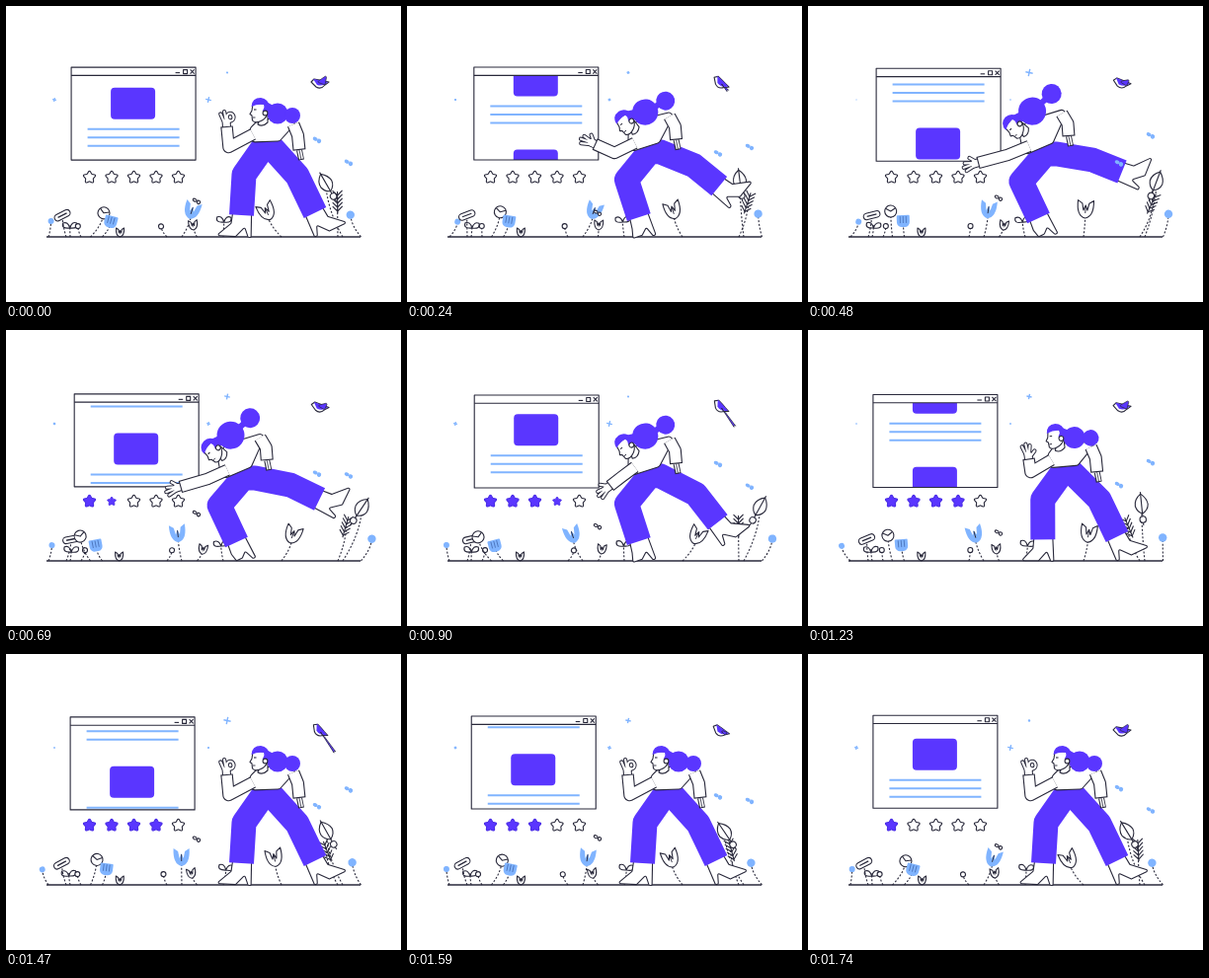
These frames come from a looping animation (400x300 px, 1770 ms). An HTML page with a canvas:

```html
<!DOCTYPE html>
<html lang="en">
<head>
<meta charset="utf-8">
<style>
html, body { margin: 0; width: 100%; height: 100%; overflow: hidden; background: #fff; }
canvas { display: block; width: 400px; height: 300px; }
</style>
</head>
<body>
<canvas id="stage" width="400" height="300"></canvas>
<script>
const g = document.getElementById('stage').getContext('2d');
const LOOP = 1770, STEP = 30, TAU = Math.PI * 2;
const INK = '#29293b', PURPLE = '#5a36ff', BLUE = '#80b4ff', WHITE = '#fff';
let t = 0;

// Timing helpers
const mix = (a, b, k) => a + (b - a) * k;
const wave = (period, peak = 0) => Math.cos(TAU * (t - peak) / period);
function ease(u) {
  u = Math.max(0, Math.min(1, u));
  return u * u * (3 - 2 * u);
}
const pulse = (rise, hold, end) => ease(t / rise) * (1 - ease((t - hold) / (end - hold)));

// Drawing helpers
function paint(fill, stroke, width = 1.1) {
  if (fill) { g.fillStyle = fill; g.fill(); }
  if (stroke) { g.strokeStyle = stroke; g.lineWidth = width; g.stroke(); }
}
function line(pts, color = INK, width = 1.1) {
  g.beginPath();
  for (let i = 0; i < pts.length; i += 2) g.lineTo(pts[i], pts[i + 1]);
  paint(null, color, width);
}
// Closed outline with rounded corners
function poly(pts, radius, fill, stroke, width) {
  const n = pts.length, p = i => pts[i % n];
  g.beginPath();
  g.moveTo((p(0) + p(n - 2)) / 2, (p(1) + p(n - 1)) / 2);
  for (let i = 0; i < n; i += 2) g.arcTo(p(i), p(i + 1), p(i + 2), p(i + 3), radius);
  g.closePath();
  paint(fill, stroke, width);
}
function shape(d, fill, stroke, width = 1.1) {
  const path = new Path2D(d);
  if (fill) { g.fillStyle = fill; g.fill(path); }
  if (stroke) { g.strokeStyle = stroke; g.lineWidth = width; g.stroke(path); }
}
function dot(x, y, r, fill, stroke, ry = r) {
  g.beginPath();
  g.ellipse(x, y, r, ry, 0, 0, TAU);
  paint(fill, stroke);
}
function box(x, y, w, h, r, fill, stroke) {
  g.beginPath();
  g.roundRect(x, y, w, h, r);
  paint(fill, stroke);
}
function at(x, y, angle, draw, scale = 1) {
  g.save();
  g.translate(x, y);
  g.rotate(angle);
  g.scale(scale, scale);
  draw();
  g.restore();
}
// Outlined sleeve, closed with a cuff at its far end
function limb(a, b, c, width) {
  const d = Math.hypot(c[0] - b[0], c[1] - b[1]);
  const inner = c.map((v, i) => v - (v - b[i]) / d * 1.1);
  line([...a, ...b, ...c], INK, width);
  line([...a, ...b, ...inner], WHITE, width - 2.2);
}

function drawWindow() {
  const x = 67.2 + 2.1 * wave(LOOP, 600), y = 64 - 2.1 * wave(LOOP, 130);
  at(x, y, 0, () => {
    g.save();
    g.beginPath();
    g.rect(0, 8.5, 126, 85.5);
    g.clip();
    // Two full periods of the page scroll by in each loop
    for (let i = 0; i < 4; i++) {
      const top = 20.7 + 86 * (i - 2 * t / LOOP);
      box(40, top, 45, 32, 4, PURPLE);
      for (let k = 0; k < 3; k++) {
        const ly = top + 42 + 8.5 * k;
        line([16.5, ly, 109.5, ly], BLUE, 2);
      }
    }
    g.restore();
    box(0, 0, 126, 94, 0, null, INK);
    line([0, 8.3, 126, 8.3]);
    line([105.5, 5.5, 110, 5.5]);
    box(113.5, 2.5, 4, 4, 0, null, INK);
    line([120.5, 2.3, 124.5, 6.5]);
    line([124.5, 2.3, 120.5, 6.5]);
  });
}

function drawStars() {
  const pts = [];
  for (let i = 0; i < 10; i++) {
    const r = i % 2 ? 4 : 7.4, a = i * TAU / 10 - TAU / 4;
    pts.push(r * Math.cos(a), r * Math.sin(a));
  }
  for (let i = 0; i < 5; i++) {
    const p = i < 4 && t < LOOP - i * 60 ? Math.min(1, (t - 540 - i * 105) / 90) : 0;
    const on = p > 0;
    at(84.5 + 22.5 * i, 173.7, 0, () => poly(pts, 1, on ? PURPLE : WHITE, on ? '#4a2de6' : INK),
      on ? 0.4 + 0.6 * p : 1);
  }
}

// Flower heads, drawn around the top of a stem
const tulip = (fill, size) => () => {
  g.scale(size, size);
  shape('M-8 -9 L-3.5 -6 L-2 1 L0 -4 L2 1 L3.5 -6 L8 -9 Q9 7 0 9 Q-9 7 -8 -9 Z',
    fill, fill === WHITE ? INK : null, 1.1 / size);
  line([0, -3, 0, 4], INK, 0.9);
};
const ball = r => () => dot(0, 0, r, BLUE);
const ring = () => dot(0, 0, 2.5, WHITE, INK);
const brush = () => {
  box(-6.5, -6, 13, 12, [1, 1, 5, 5], BLUE);
  for (const x of [-3, 0, 3]) line([x, -5, x, 2], '#4d76bd', 0.9);
};
const disc = () => {
  dot(0, 0, 6, WHITE, INK);
  line([-5, -3, 0, 0, 5, -3]);
};
const pill = () => {
  g.rotate(-0.35);
  box(-8.5, -3.3, 17, 6.6, 3.3, WHITE, INK);
  line([-5, 0, 5, 0], INK, 1.3);
};
const sprout = () => shape('M0 3 Q-9 4 -7 -2 Q-2 -4 0 3 Q9 4 7 -2 Q2 -4 0 3', WHITE, INK);
const stalk = () => {
  line([0, -6, 0, 16]);
  for (let y = -4; y < 14; y += 4) line([-5, y - 3, 0, y + 2, 5, y - 3]);
};
const leaf = () => {
  shape('M0 -10 Q-7 -5 -6.5 2 Q-5 8 0 10 Q6 7 6.5 1 Q6 -5 0 -10 Z', WHITE, INK);
  line([0, -12, 0, 22]);
  dot(0, 16, 3.2, WHITE, INK);
};

// A plant on the ground line whose tip sways once per loop
function plant(head, x, y, swing, peak) {
  const dx = swing * wave(LOOP, peak);
  const tip = y + 0.01 * dx * dx;
  g.setLineDash([2, 1.8]);
  g.beginPath();
  g.moveTo(x, 234);
  g.quadraticCurveTo(x + dx * 0.9, (tip + 234) / 2, x + dx, tip);
  paint(null, INK);
  g.setLineDash([]);
  at(x + dx, tip, 0.03 * dx, head);
}

function drawPlants() {
  plant(ball(3), 43, 218, 9, 360);
  plant(sprout, 65, 222, 1.5, 500);
  plant(pill, 61, 212, 5, 700);
  plant(ring, 76, 223, 4, 700);
  plant(disc, 85.5, 208, 13.5, 0);
  plant(brush, 97.5, 218, 8.5, 0);
  plant(tulip(WHITE, 0.5), 115, 229.5, 0.5, 0);
  plant(ring, 163, 223, 6, 850);
  plant(tulip(BLUE, 1), 178, 206, 12, 150);
  plant(tulip(WHITE, 0.55), 193.5, 222, 6, 650);
  plant(sprout, 220, 216, 3, 1400);
  plant(tulip(WHITE, 1), 279, 206, 15, 885);
  plant(stalk, 336, 194, 14, 450);
  plant(leaf, 341, 176, 20, 740);
  plant(ball(4.2), 359.5, 210.5, 11.5, 780);
  line([41, 234, 359, 234], INK, 1.4);
}

function butterfly(x, y, fill, stroke) {
  at(x, y, 0.4, () => {
    dot(-2.2, -0.5, 2, fill, stroke, 1.3);
    dot(2.2, 0, 1.6, fill, stroke, 1.7);
  });
}
function spark(x, y, r) {
  at(x, y, 0.2, () => {
    line([-r, 0, r, 0], BLUE, 1.4);
    line([0, -r, 0, r], BLUE, 1.4);
  });
}
function drawBird() {
  const up = wave(LOOP / 3);
  at(318, 78, 0.32 * (1 - up), () => {
    shape('M-9 -1 L-6 -4 Q0 -3 4 -2 L9 -1 L5 2 Q1 7 -4 4 Z', WHITE, INK);
    shape('M-7 -4 Q0 -3 8 -1 Q3 4 -3 2 Z', PURPLE);
    poly([-3, -1, 7, -3 - 5 * up, 5, 2], 1, PURPLE, INK, 0.7);
  });
}
function drawAir() {
  const half = wave(LOOP / 2);
  butterfly(315, 148 - 12 * half, BLUE, BLUE);
  butterfly(347, 145 + 14 * half, BLUE, BLUE);
  butterfly(193, 198 + 12 * wave(LOOP / 2, LOOP / 8), WHITE, INK);
  spark(49, 95, 1.1 + 0.9 * half);
  spark(205, 95, 1.6 + 1.3 * half);
  spark(224, 67.5, 2.2 + 1.6 * wave(LOOP / 2, 530));
  drawBird();
}

function drawHand(elbow, wrist) {
  const pinch = t < 120 || t > 1350;
  const angle = Math.atan2(wrist[0] - elbow[0], elbow[1] - wrist[1]);
  const fingers = () => {
    g.beginPath();
    g.moveTo(-2, -4); g.lineTo(-5, -13);
    g.moveTo(0, -4); g.lineTo(-1, -15);
    if (pinch) {
      g.moveTo(2, -4);
      g.ellipse(4.5, -9, 3.4, 3.8, 0, TAU / 4, TAU * 1.25);
    } else {
      g.moveTo(1, -4); g.lineTo(3, -13);
      g.moveTo(2, -2); g.lineTo(7, -7);
    }
  };
  at(...wrist, angle, () => {
    g.lineCap = 'round';
    const palm = [0, 0, 0, -3.5];
    fingers(); paint(null, INK, 4.2);
    line(palm, INK, 9);
    fingers(); paint(null, WHITE, 2.2);
    line(palm, WHITE, 7);
  });
}

// Heeled shoe continuing the shin; flip turns the toe to the right
function drawShoe(knee, ankle, flip, toeX, toeY) {
  at(...ankle, Math.atan2(knee[0] - ankle[0], ankle[1] - knee[1]), () => {
    g.scale(flip, 1);
    poly([-9, -2, -10, 9, toeX, toeY, toeX * 0.2, toeY, 4, 12, 8, 22, 11, 22, 10, -2], 1.2, WHITE, INK);
  });
}

function drawHead(x, y, lean) {
  at(x, y, -0.87 * lean, () => {
    shape('M0 8 L-2 14 Q3 17 8 12 L8 4 Z', WHITE, INK);
    shape('M-7 -7 L-8 0 L-10 3.5 L-8 5 L-7.5 10 Q-5 13 0 11 Q6 9 8 3 L7 -7 Z', WHITE, INK);
    const near = 1 + 0.3 * lean, far = 1 + 0.5 * lean;
    const a = [18 * near, 3 * near], b = [33 * far, 5 * far];
    line([5, -4, ...a], PURPLE, 10);
    line([...a, ...b], PURPLE, 6);
    dot(...a, 10.5 + 3.5 * lean, PURPLE);
    dot(...b, 8 + 2 * lean, PURPLE);
    shape('M-8.5 -4 Q-8 -13 1 -13 Q9 -12 10 -3 L9 3 L5 -1 L4 -6 Q-2 -7 -8.5 -4 Z', PURPLE);
    dot(5.5, 2.5, 2.4, WHITE, INK);
    line([-6, -1, -3.5, -1]);
    line([-7, 7, -4.5, 7], INK, 0.9);
  });
}

// Every joint runs from a standing place to a lunging place
function drawWoman() {
  const lean = pulse(360, 650, 1400), kick = pulse(400, 600, 1100), drop = pulse(490, 850, 1400);
  const joint = (x1, y1, x2, y2, kx = lean, ky = kx) => [mix(x1, x2, kx), mix(y1, y2, ky)];

  const frontHip = joint(262, 141, 240, 150), backHip = joint(267, 141, 252, 150);
  const frontKnee = joint(241, 171, 216, 178), frontAnkle = joint(238.5, 212, 233.5, 215);
  const backKnee = joint(295, 172, 288, 156, kick), backAnkle = joint(313, 209.5, 318, 168, kick);
  drawShoe(backKnee, backAnkle, -1, -25, 23);
  drawShoe(frontKnee, frontAnkle, 1, mix(-24, -8, lean), mix(22, 17, lean));
  line([...frontAnkle, ...frontKnee, ...frontHip, ...backHip, ...backKnee, ...backAnkle], PURPLE, 25);

  const torso = [
    joint(253, 118, 214, 129), joint(247, 124, 216, 140), joint(249, 138, 220, 151),
    joint(277, 137, 248, 139), joint(297, 115, 264, 103), joint(268, 114, 222, 116)];
  poly(torso.flat(), 4, WHITE, INK);

  const backElbow = joint(295.5, 131, 263, 119), backCuff = joint(297, 146, 264, 132);
  const tip = [backCuff[0] + 2, backCuff[1] + 10];
  line([...backCuff, ...tip], INK, 6);
  line([...backCuff, tip[0], tip[1] - 1], WHITE, 4);
  line([...backCuff, ...tip], INK, 0.8);
  limb(joint(291, 120, 257, 109), backElbow, backCuff, 13);

  const elbow = joint(225.5, 143, 202, 151, kick, lean);
  const cuff = joint(223.5, 122, 172, 159, kick, drop);
  drawHand(elbow, cuff);
  limb(joint(250, 130, 224, 142), elbow, cuff, 12.5);

  drawHead(...joint(257, 106, 209, 122), lean);
}

function frame(now) {
  t = Math.floor(now % LOOP / STEP) * STEP;
  g.clearRect(0, 0, 400, 300);
  g.lineJoin = 'round';
  drawWindow();
  drawStars();
  drawPlants();
  drawWoman();
  drawAir();
  requestAnimationFrame(frame);
}
requestAnimationFrame(frame);
</script>
</body>
</html>
```
